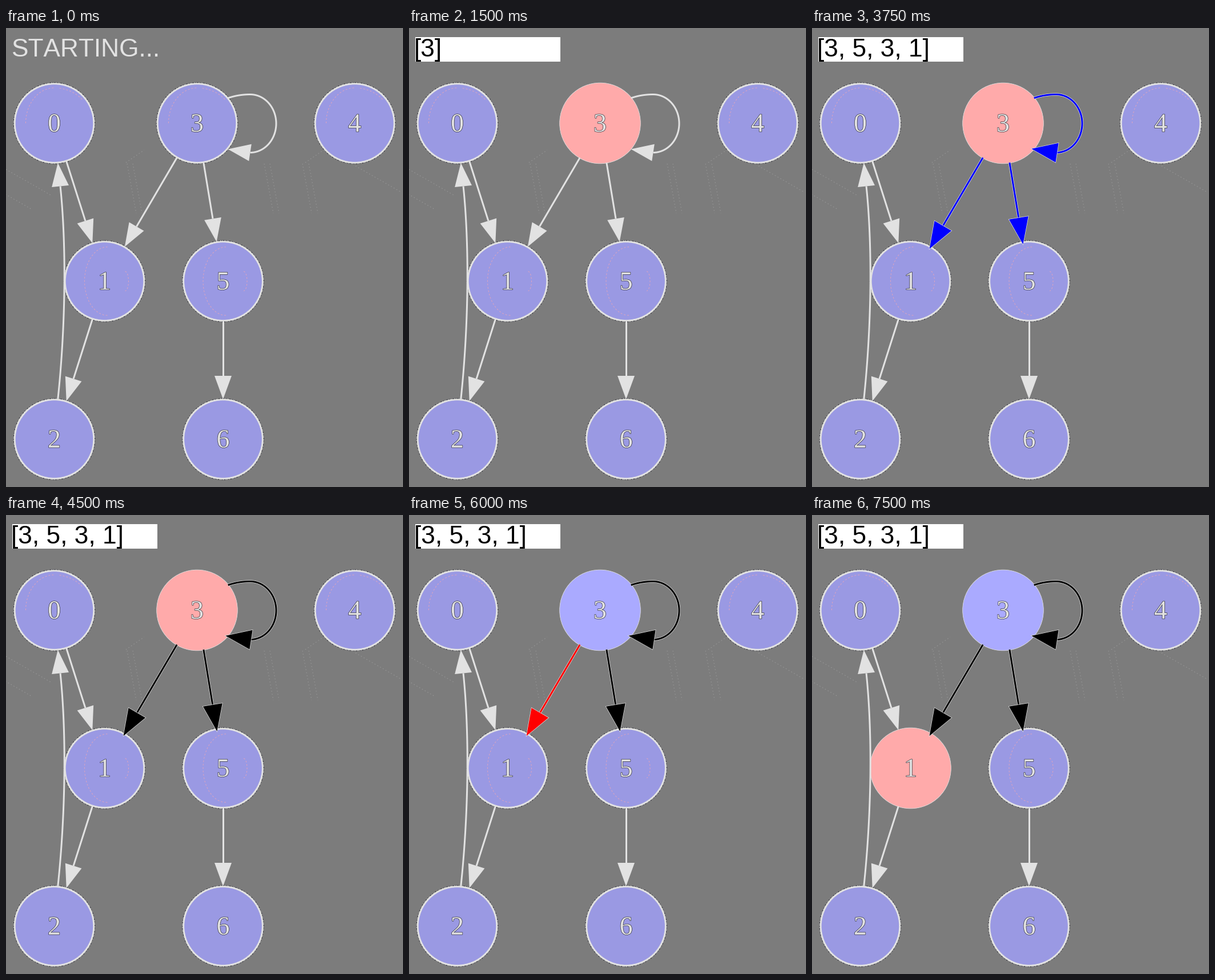
Write a matplotlib script that moves like this. It is 695 by 805 pixels and loops after 8000 ms.

```python
import matplotlib.pyplot as plt
import matplotlib.patheffects as pe
import numpy as np
from matplotlib.animation import FuncAnimation
from matplotlib.patches import Circle, PathPatch, Polygon, Rectangle
from matplotlib.path import Path

W, H, DPI = 695, 805, 100
PX = 72 / DPI
INTERVAL, LOOP = 250, 8000

GRAY, PALE, GHOST, DARK = "#7c7c7c", "#e2e2e2", "#9c9c9c", "#2c2c34"
IDLE, ACTIVE, DONE, PINK = "#9a99e3", "#ffaaaa", "#aaaaff", "#dca4c0"

RADIUS, TOP, RANK_GAP = 70, 167, 277
HEAD_LENGTH, HEAD_HALF = 41, 15
LINE = 3

# Node: (x, rank)
LAYOUT = {0: (84.5, 0), 3: (334.5, 0), 4: (610.5, 0),
          1: (172.5, 1), 5: (380, 1), 2: (84.5, 2), 6: (380, 2)}
CENTERS = {n: np.array([x, TOP + RANK_GAP * rank])
           for n, (x, rank) in LAYOUT.items()}
LINKS = [(0, 1), (1, 2), (2, 0), (5, 6), (3, 1), (3, 5), (3, 3)]

plt.rcParams["text.kerning_factor"] = 6
fig = plt.figure(figsize=(W / DPI, H / DPI), dpi=DPI, facecolor=GRAY)
ax = fig.add_axes([0, 0, 1, 1])
ax.set(xlim=(0, W), ylim=(H, 0))
ax.axis("off")


def unit(v):
    return v / np.hypot(*v)


def arc(center, rx, ry, start, end):
    a = np.radians(np.linspace(start, end, 60))
    return np.column_stack([center[0] + rx * np.cos(a), center[1] + ry * np.sin(a)])


def bezier(p0, p1, p2, p3):
    t = np.linspace(0, 1, 40)[:, None]
    return ((1 - t) ** 3 * p0 + 3 * t * (1 - t) ** 2 * p1
            + 3 * t ** 2 * (1 - t) * p2 + t ** 3 * p3)


def stroke(points, **style):
    style = {"lw": PX, "capstyle": "butt", **style}
    return ax.add_patch(PathPatch(Path(points), fill=False, **style))


def link_shape(tail, head, bow):
    """Points of the line and its arrow tip, between two node rims."""
    along = unit(head - tail)
    side = np.array([along[1], -along[0]])
    lean = 0.09 * side * (bow != 0)
    start = tail + RADIUS * unit(along - lean)
    tip = head - RADIUS * unit(along + lean)
    c1, c2 = (start + (tip - start) * k - bow * side for k in (1 / 3, 2 / 3))
    base = tip - HEAD_LENGTH * unit(tip - c2)
    return bezier(start, c1, c2, base), tip


def loop_shape(center):
    """Self link: an oval drawn out towards the node."""
    middle = center + (93, 0.5)
    line = np.vstack([arc(middle, 80, 51, -119, -90), arc(middle, 45.5, 51, -90, 90)])
    return line, center + (54, 45.5)


def make_link(tail, head):
    if tail == head:
        line, tip = loop_shape(CENTERS[tail])
    else:
        bow = -14.5 if tail > head and (head, 1) in LINKS and tail == 2 else 0
        line, tip = link_shape(CENTERS[tail], CENTERS[head], -bow)
    base = line[-1]
    dx, dy = unit(tip - base)
    side = HEAD_HALF * np.array([-dy, dx])
    arrow = Polygon([base + side, tip, base - side], zorder=5)
    return stroke(line, zorder=5), ax.add_patch(arrow)


def node_marks(center, rank):
    """Faint traces inside the nodes of the two upper ranks."""
    if rank == 0:
        return [arc(center, 50, 62, 180, 270), arc(center, 66, 62, 278, 320)]
    if rank == 1:
        return [arc(center + (5, 0), 40, 60, 90, 270),
                arc(center + (36, 0), 6, 17, -90, 90)]
    return []


def make_node(name):
    center, rank = CENTERS[name], LAYOUT[name][1]
    disc = ax.add_patch(Circle(center, RADIUS, zorder=2))
    details = [ax.add_patch(Circle(center, RADIUS + 1.3, fill=False, ec=DARK,
                                   lw=PX, ls=(0, (2, 3, 1, 5)), zorder=3))]
    details += [stroke(points, ec=PINK, ls=(0, (3, 3)), zorder=3)
                for points in node_marks(center, rank)]
    x, y = center
    ax.text(x, y + 14.7, str(name), ha="center", va="baseline", zorder=4,
            family="Liberation Serif", size=46 * PX, color=PALE,
            path_effects=[pe.withStroke(linewidth=1.3 * PX, foreground=DARK)])
    return disc, details


def paint_node(name, color):
    disc, details = nodes[name]
    idle = color == IDLE
    disc.set(facecolor=color, edgecolor=PALE, radius=RADIUS - 0.7 if idle else RADIUS + 0.8,
             linewidth=(LINE if idle else 0.8) * PX)
    for item in details:
        item.set_visible(idle)


def paint_link(link, color):
    """Coloured links are outlined and carry a thin pale halo."""
    line, arrow = links[link]
    plain = color == PALE
    halo = [] if plain else [pe.withStroke(linewidth=(LINE + 1.4) * PX, foreground=PALE)]
    line.set(edgecolor=color, linewidth=LINE * PX, path_effects=halo)
    arrow.set(facecolor=color, edgecolor=color,
              linewidth=0 if plain else LINE * PX, path_effects=halo)


def draw_ghosts():
    slanted = [((x, 238), (16, 87)) for x in (212, 222, 452, 462, 519, 530)]
    sloping = [((x, y), (80, 46)) for x, y in ((0, 248), (-35, 272), (612, 242))]
    hooks = [((x, 236), (32, -22)) for x in (210, 524)]
    for (x, y), (dx, dy) in slanted + sloping + hooks:
        stroke([(x, y), (x + dx, y + dy)], ec=GHOST, ls=(0, (1.5, 4)), zorder=1)


draw_ghosts()
nodes = {name: make_node(name) for name in LAYOUT}
links = {link: make_link(*link) for link in LINKS}
panel = ax.add_patch(Rectangle((11, 16), 254, 43, fc="white", lw=0, zorder=1))
title = ax.text(9, 50, "", va="baseline", family="Liberation Sans", size=44.3 * PX)


def update(frame):
    t = frame * INTERVAL
    started = t >= 750
    panel.set_visible(started)
    title.set_color("black" if started else PALE)
    title.set_text("STARTING..." if not started else
                   "[3]" if t < 3750 else "[3, 5, 3, 1]")

    for name in nodes:
        paint_node(name, IDLE)
    if t >= 1500:
        paint_node(3, ACTIVE if t < 5250 else DONE)
    if t >= 6750:
        paint_node(1, ACTIVE)

    for link in links:
        visited = link[0] == 3 and t >= 3000
        paint_link(link, PALE if not visited else "blue" if t < 4500 else "black")
    if 6000 <= t < 7500:
        paint_link((3, 1), "red")
    return []


anim = FuncAnimation(fig, update, frames=LOOP // INTERVAL, interval=INTERVAL,
                     init_func=lambda: update(0), repeat=True, repeat_delay=0)
plt.show()
```
